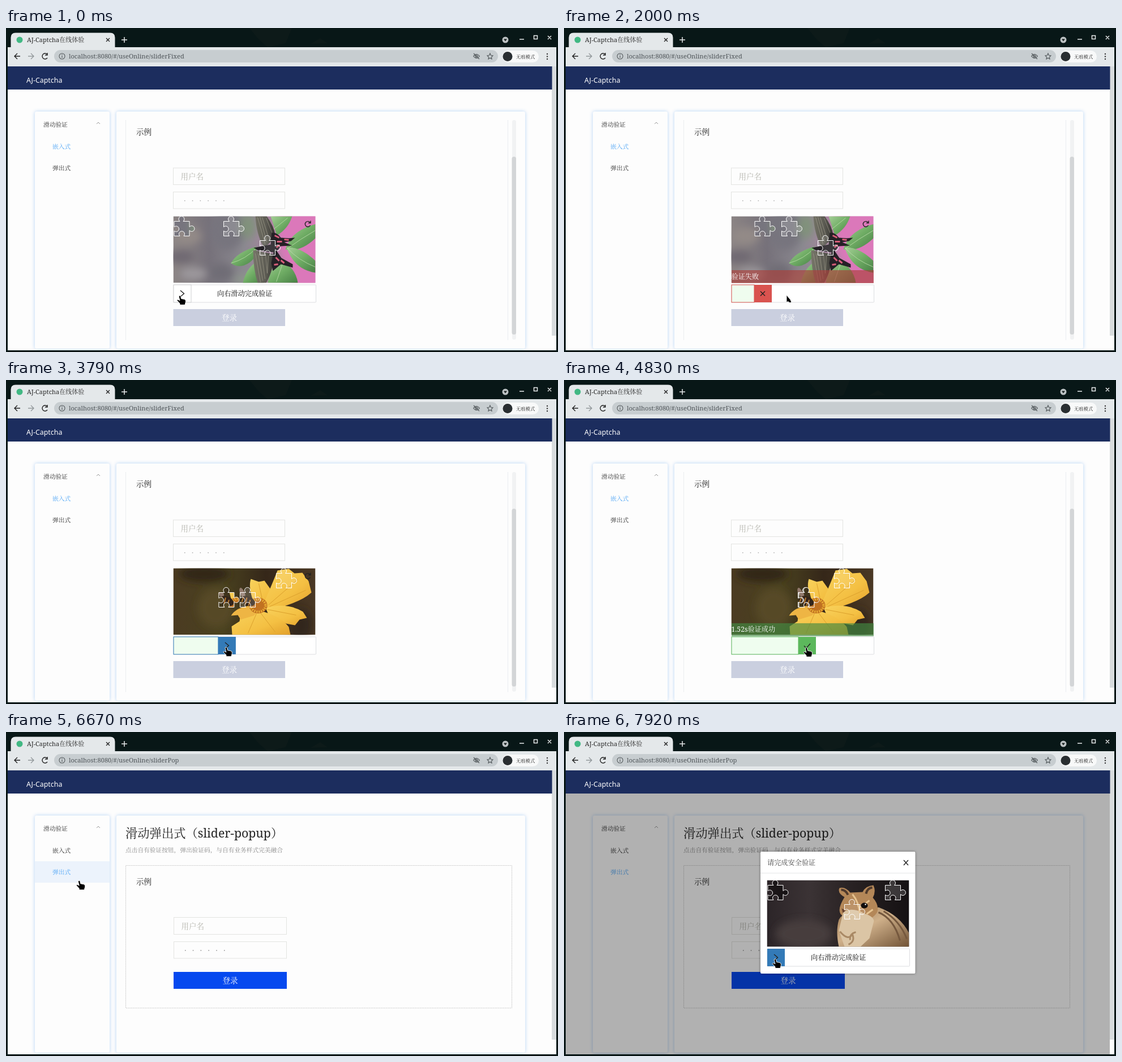
These frames come from a looping animation (975x574 px, 8 s). An HTML page:

```html
<!DOCTYPE html>
<html lang="zh">
<head>
<meta charset="utf-8">
<title>AJ-Captcha在线体验</title>
<style>
html, body { margin: 0; width: 100%; height: 100%; overflow: hidden; background: #081717; }
svg { display: block; width: 975px; height: 574px; }
text { font-family: "Noto Serif", "Noto Serif CJK SC", "Noto Sans CJK SC", "Noto Sans CJK", serif; font-size: 10.7px; fill: #2c2c2c; white-space: pre; }
.mid { font-size: 12.2px; fill: #080808; }
.big { font-size: 13.5px; fill: #1c1c1c; }
.hint { font-size: 13.5px; fill: #b3b3ab; }
.button { font-size: 13.5px; fill: #fff; text-anchor: middle; }
.line { fill: none; stroke: #222; stroke-width: 1.4; }
.field { fill: #fdfdfd; stroke: #e3e4e1; }
.card { fill: #fdfdfd; filter: drop-shadow(0 0 3px #b4d3f6); }
.outline { stroke: #fff; stroke-width: 1; }
</style>
</head>
<body>
<svg viewBox="0 0 975 574">
<defs>
  <path id="jigsaw" d="M0 9H10A5 5 0 1 1 16 9H27V19A5 5 0 1 1 27 25V35H17A5 5 0 1 0 10 35H0V26A5 5 0 1 0 0 19Z"/>
  <clipPath id="jigsawClip"><use href="#jigsaw"/></clipPath>
  <clipPath id="photoClip"><rect width="251" height="118"/></clipPath>
  <clipPath id="tipClip"><rect x="296" y="333" width="251" height="122"/></clipPath>
  <clipPath id="pageClip"><rect x="3" y="68" width="961" height="503"/></clipPath>
  <filter id="soft" x="-50%" y="-50%" width="200%" height="200%"><feGaussianBlur stdDeviation="7"/></filter>
  <filter id="fine"><feGaussianBlur stdDeviation=".7"/></filter>
  <linearGradient id="stone"><stop stop-color="#8b8484"/><stop offset=".25" stop-color="#76717a"/><stop offset=".5" stop-color="#8b8990"/><stop offset="1" stop-color="#d680b8"/></linearGradient>
  <linearGradient id="leaf" x2="1" y2="1"><stop stop-color="#a5cf97"/><stop offset=".5" stop-color="#70ad65"/><stop offset="1" stop-color="#477f45"/></linearGradient>
  <linearGradient id="wing" x2="1"><stop stop-color="#777669"/><stop offset=".6" stop-color="#5b5a52"/><stop offset="1" stop-color="#34332f"/></linearGradient>
  <linearGradient id="earth"><stop stop-color="#4b3b22"/><stop offset=".35" stop-color="#4a421f"/><stop offset=".65" stop-color="#352719"/><stop offset="1" stop-color="#4a3824"/></linearGradient>
  <linearGradient id="petal" x2="1" y2="1"><stop stop-color="#f8d25c"/><stop offset=".6" stop-color="#f4c043"/><stop offset="1" stop-color="#e2a02b"/></linearGradient>
  <linearGradient id="night"><stop stop-color="#2c2528"/><stop offset=".3" stop-color="#3b3335"/><stop offset=".55" stop-color="#2b2425"/><stop offset="1" stop-color="#151113"/></linearGradient>
  <linearGradient id="fur" x2="1" y2="1"><stop stop-color="#a17b51"/><stop offset=".45" stop-color="#cfb08a"/><stop offset="1" stop-color="#705235"/></linearGradient>

  <g id="butterfly" clip-path="url(#photoClip)">
    <rect width="251" height="118" fill="url(#stone)"/>
    <g filter="url(#soft)">
      <ellipse cx="25" cy="35" rx="25" ry="16" fill="#938a87"/><ellipse cx="12" cy="72" rx="25" ry="12" fill="#6f6972"/>
      <ellipse cx="35" cy="102" rx="24" ry="12" fill="#9b979b"/><ellipse cx="85" cy="100" rx="22" ry="16" fill="#706d76"/>
      <ellipse cx="95" cy="25" rx="30" ry="35" fill="#77757e"/><path d="M180-10H260V130H215L185 55Z" fill="#db78ba"/>
      <ellipse cx="132" cy="18" rx="14" ry="22" fill="#81927b"/><ellipse cx="125" cy="112" rx="18" ry="9" fill="#8c948b"/>
    </g>
    <g filter="url(#fine)">
      <g fill="url(#leaf)">
        <path d="M102 83Q112 64 146 54Q150 77 125 87Q112 91 102 83Z"/>
        <path d="M123 118Q128 94 145 82L160 118Z"/>
        <path d="M172 0H210Q203 22 183 34Z"/>
        <path d="M198 59Q207 26 251 14V39Q225 64 198 59Z"/>
        <path d="M200 55Q225 54 251 79V100Q213 94 200 55Z"/>
        <path d="M167 118Q170 92 190 78Q216 91 220 118Z"/>
      </g>
      <path d="M102 83Q128 76 147 56M199 59Q225 40 251 25M202 57Q221 78 251 90M182 116L193 84M176 24L202 3" fill="none" stroke="#bedfac" stroke-width=".8"/>
      <path d="M145 0H165Q178 18 180 33Q174 47 160 55Q147 34 145 0ZM141 60L177 67Q178 94 164 118H149Q141 93 141 60Z" fill="url(#wing)"/>
      <path d="M149 2L162 49M153 1L165 45M157 2L169 40M164 3L175 31M145 66L154 117M150 66L158 114M156 67L162 111M163 69L166 101M168 69L166 101" stroke="#aaa694" stroke-width=".6"/>
      <path d="M174 29Q183 28 190 38L204 39L215 38L208 44L196 46L210 52L190 53L183 62L191 74L211 85L211 91L190 85L176 97L173 83L177 64L149 60L142 56L172 50Z" fill="#252126"/>
      <path d="M179 34L187 38M183 45L192 45M182 55L188 51M181 73L187 79M178 86L185 85M190 78L196 83M196 41L204 42" stroke="#d85d79" stroke-width="3"/>
    </g>
  </g>

  <g id="flower" clip-path="url(#photoClip)">
    <rect width="251" height="118" fill="url(#earth)"/>
    <g filter="url(#soft)"><ellipse cx="75" cy="70" rx="32" ry="35" fill="#564a25"/><ellipse cx="55" cy="10" rx="45" ry="15" fill="#302719"/><ellipse cx="225" cy="100" rx="20" ry="28" fill="#30271b"/></g>
    <g filter="url(#fine)">
      <path d="M142 61Q132 33 137 19L151 24L161 22L171 36L181 42L171 71Z" fill="url(#petal)"/>
      <path d="M158 66Q176 25 184 4L204 1L214 9L228 8L239 23L244 43Q226 60 178 72Z" fill="url(#petal)"/>
      <path d="M163 70Q201 60 229 77L236 88L223 91L215 101L199 98L168 82Z" fill="url(#petal)"/>
      <path d="M151 75Q188 83 204 104L207 118H104L103 103L117 94L118 87Z" fill="url(#petal)"/>
      <path d="M102 84Q111 69 137 66L153 73L142 84L119 91L114 83Z" fill="#eeb544"/>
      <path d="M168 65L220 20M170 68L234 39M166 73L217 83M154 79L180 113M147 80L132 115M158 60L151 27" stroke="#dca12d"/>
      <ellipse cx="150" cy="66" rx="16" ry="14" fill="#c17221"/><ellipse cx="150" cy="66" rx="13" ry="11" fill="none" stroke="#edb336" stroke-width="4" stroke-dasharray="2 2"/>
      <ellipse cx="122" cy="44" rx="4" ry="10" fill="#91796c" transform="rotate(-22 122 44)"/>
      <ellipse cx="132" cy="58" rx="13" ry="8" fill="#34251b" transform="rotate(25 132 58)"/>
      <path d="M124 51L121 60M130 52L127 64M136 56L133 66" stroke="#bd7d32" stroke-width="2"/>
    </g>
  </g>

  <g id="squirrel" clip-path="url(#photoClip)">
    <rect width="251" height="118" fill="url(#night)"/>
    <ellipse cx="65" cy="95" rx="50" ry="25" fill="#463c3d" filter="url(#soft)"/>
    <g filter="url(#fine)">
      <path d="M127 118Q121 91 127 70Q132 58 150 61L197 48Q235 62 251 94V118Z" fill="url(#fur)"/>
      <path d="M137 30Q124 23 128 14Q138 11 147 22L169 21Q174 10 188 9Q193 20 187 31Q198 43 195 56Q187 71 161 75Q138 70 130 60Q124 51 137 30Z" fill="#b48758"/>
      <path d="M131 17Q139 17 143 26M175 24Q177 14 186 13" fill="none" stroke="#503a2c" stroke-width="4"/>
      <path d="M135 55Q154 48 171 59Q187 63 189 72L181 103L165 118H137L127 89Z" fill="#dbc5a5"/>
      <path d="M151 25Q162 38 164 59M181 36L165 48M187 52L176 60" fill="none" stroke="#e6c390" stroke-width="3"/>
      <path d="M197 57Q224 68 235 107M206 55Q235 72 247 104" fill="none" stroke="#75583e" stroke-width="3"/>
      <ellipse cx="172" cy="45" rx="6" ry="5" fill="#100d0d"/><circle cx="174" cy="43" r="1.2" fill="#fff"/>
      <path d="M132 50L139 54L134 58Z" fill="#65402e"/>
      <path d="M129 91Q143 108 151 96Q156 109 144 114M157 92Q145 95 147 106" fill="none" stroke="#a98965" stroke-width="3"/>
    </g>
  </g>
</defs>

<!-- Browser window -->
<rect width="975" height="574" fill="#081717"/>
<path d="M430 0H505L494 27L462 34L446 20ZM538 28L555 18L568 27Z" fill="#0d1a19"/>
<path d="M3 34H8.5V17Q8.5 8.5 17 8.5H184Q192.5 8.5 192.5 17V34H972V68H3Z" fill="#e4e8ea"/>
<circle cx="24" cy="21" r="5.5" fill="#41b883"/>
<text x="37" y="25" style="font-size:11px">AJ-Captcha在线体验</text>
<path class="line" d="M177 18L183 24M183 18L177 24"/>
<path d="M204 21H214M209 16V26M907 20H915M932.5 13.5H938.5V19.5H932.5ZM957 14L963 20M963 14L957 20" fill="none" stroke="#e7eaeb" stroke-width="1.5"/>
<circle cx="882" cy="21" r="5.5" fill="#bdc2c4"/><path d="M879 19.5H885L882 23.5Z" fill="#17201f"/>
<rect x="85" y="39" width="784" height="22" rx="11" fill="#c7cdd0"/>
<rect x="877" y="40" width="64" height="21" rx="10.5" fill="#f8f9f9"/>
<circle cx="886" cy="50.5" r="8.5" fill="#292e31"/>
<text x="901" y="54" style="font-size:8.3px">无痕模式</text>
<path class="line" d="M25 50H15M20 45L15 50L20 55M73 47A5 5 0 1 0 73 53M73 44V48H69"/>
<path class="line" style="stroke:#93999c" d="M39 50H49M44 45L49 50L44 55"/>
<g fill="none" stroke="#52585b" stroke-width="1.1">
  <circle cx="99" cy="50" r="5"/><path d="M99 49V53M99 46.5V48M825.5 50Q831 43 836.5 50Q831 57 825.5 50M826 45L836 55"/><circle cx="831" cy="50" r="2"/>
  <path d="M855 45L856.5 48.5L860 49L857.5 51.5L858 55L855 53L852 55L852.5 51.5L850 49L853.5 48.5Z"/>
</g>
<g fill="#333"><circle cx="956" cy="46" r="1.2"/><circle cx="956" cy="50.5" r="1.2"/><circle cx="956" cy="55" r="1.2"/></g>
<text id="url" x="111" y="54" style="font-size:11.1px;fill:#50565a"></text>

<!-- Page -->
<rect x="3" y="68" width="969" height="503" fill="#fdfdfd"/>
<rect x="964" y="68" width="8" height="477" fill="#d8dcde"/>
<rect x="3" y="68" width="961.5" height="41" fill="#1c2d5e"/>
<text x="36" y="97" style="font:500 12.4px 'Noto Sans',sans-serif;fill:#fff">AJ-Captcha</text>
<g clip-path="url(#pageClip)">
  <rect class="card" x="51" y="148" width="132" height="420" rx="3"/>
  <rect class="card" x="195" y="148" width="722" height="420" rx="3"/>
  <rect id="menuRow" x="51" y="229" width="132" height="38"/>
  <text x="66" y="175">滑动验证</text>
  <path d="M160 170L163 167L166 170" fill="none" stroke="#999"/>
  <text id="menuFixed" x="82" y="214">嵌入式</text>
  <text id="menuPop" x="82" y="252">弹出式</text>
  <g id="fixedPage">
    <path d="M211.5 163V553M886.5 163V553" stroke="#ebedf0"/>
    <rect x="894" y="163" width="7" height="389" rx="3.5" fill="#f1f2f3"/><rect x="893.5" y="228" width="7.5" height="315" rx="3.5" fill="#d3d5d7"/>
    <text class="big" x="230" y="189">示例</text>
    <rect class="field" x="295.5" y="248" width="197" height="29.5"/><rect class="field" x="295.5" y="290.5" width="197" height="29.5"/>
    <text class="hint" x="308.5" y="268">用户名</text>
    <path d="M315 306H386" stroke="#aaa" stroke-width="1.5" stroke-dasharray="1.5 12.3"/>
    <rect x="295.5" y="498" width="197.5" height="30" fill="#cacfdf"/>
    <text class="button" x="394.5" y="518">登录</text>
  </g>
  <g id="popPage">
    <text x="211" y="187" style="font-size:21.3px;fill:#222">滑动弹出式（slider-popup）</text>
    <text x="211" y="213" style="fill:#858585">点击自有验证按钮，弹出验证码，与自有业务样式完美融合</text>
    <rect x="211.5" y="236.5" width="682" height="252.5" fill="none" stroke="#ccc" stroke-dasharray="2 1"/>
    <text class="big" x="230" y="270">示例</text>
    <rect class="field" x="296.5" y="328.5" width="199" height="30"/><rect class="field" x="296.5" y="371.5" width="199" height="29.5"/>
    <text class="hint" x="309.5" y="349">用户名</text>
    <path d="M316 387H387" stroke="#888" stroke-width="1.5" stroke-dasharray="1.5 12.3"/>
    <rect x="296" y="425" width="200" height="30" fill="#0649ef"/>
    <text class="button" x="396" y="445">登录</text>
  </g>
</g>
<g id="dialog">
  <rect x="3" y="109" width="961" height="462" fill="#000" opacity=".3"/>
  <rect x="347" y="212" width="273.5" height="216" rx="2" fill="#fff" style="filter:drop-shadow(0 0 2px #0006)"/>
  <path d="M347 250H620" stroke="#e4e5e6"/>
  <text class="mid" x="359" y="236" style="fill:#444">请完成安全验证</text>
  <path class="line" d="M600 227L608 236M608 227L600 236"/>
</g>

<g id="captcha">
  <g transform="translate(295.5 333.5)">
    <use id="photo"/>
    <use id="hole" class="outline" href="#jigsaw" fill="#fff" fill-opacity=".15"/>
    <use id="decoy" class="outline" href="#jigsaw" fill="#fff" fill-opacity=".1"/>
    <g id="piece"><g clip-path="url(#jigsawClip)"><use id="cutout"/></g><use class="outline" href="#jigsaw" fill="none"/></g>
    <path id="reload" class="line" d="M241.5 11A4.8 4.8 0 1 0 242 16M242.5 8V12H238.5"/>
  </g>
  <g clip-path="url(#tipClip)"><g id="tip">
    <rect id="tipBack" x="295.5" y="429" width="252" height="23" fill-opacity=".65"/>
    <text id="tipText" class="mid" x="295.5" y="444.5" style="fill:#fff"></text>
  </g></g>
  <rect x="296" y="455" width="251.5" height="31" rx="1" fill="#fff" stroke="#dcdde0"/>
  <text id="prompt" class="mid" x="373" y="475">向右滑动完成验证</text>
  <rect id="trail" x="296" y="455" height="31" fill="#effdef"/>
  <g id="handle">
    <rect id="block" x="296" y="455" width="31" height="31"/>
    <path id="icon" class="line"/>
  </g>
</g>
<path id="cursor" fill="#000" stroke="#fff" stroke-width=".9"/>
</svg>
<script>
const LOOP = 8000, MENU_CLICK = 6450, DIALOG_OPEN = 7580, RESET = 300;
const URL_BASE = 'localhost:8080/#/useOnline/';
const HAND = 'M-1-1Q-3-1-2.7 1L-1 8Q-5 5-6 7.5L-1 13V15.5H8L9.5 10Q10 6 7 5.5L1.5 4.5.7.5Q.4-1-1-1Z';
const ARROW = 'M0 0V13L3 11.5L5 13.5H9L7 8.5Z';
const ICONS = {
  right: 'M308 465L314.5 470.5L308 476',
  cross: 'M307 466.5L315 474.5M315 466.5L307 474.5',
  check: 'M306 471L310 475L317 467'
};

const path = [
  [0, 308, 475], [300, 308, 475], [1250, 348, 475], [1450, 348, 475], [1900, 393, 473],
  [2100, 393, 473], [2500, 311, 473], [2980, 311, 473], [4300, 429, 475], [5000, 429, 475],
  [5950, 113, 251], [6550, 113, 251], [7300, 360, 440], [7540, 360, 440], [7880, 374, 403], [LOOP, 374, 403]
];
const drags = [
  { start: 300, end: 1350, reset: 2350, fromX: 308, color: '#d9534f', tip: '#ac3f3b', icon: 'cross', words: '验证失败' },
  { start: 2980, end: 4500, reset: 5500, fromX: 311, color: '#5cb85c', tip: '#428b42', icon: 'check', words: '1.52s验证成功' }
];
const puzzles = [
  { from: 0, photo: 'butterfly', hole: [89, 0], decoy: [153, 34] },
  { from: 2460, photo: 'flower', hole: [118, 34], decoy: [182, 0] },
  { from: 5620, photo: 'flower', hole: [83, 34], decoy: [186, 0] },
  { from: DIALOG_OPEN, photo: 'squirrel', hole: [209, 0], decoy: [137, 34] }
];

const el = Object.fromEntries([...document.querySelectorAll('[id]')].map(node => [node.id, node]));
const set = (name, attrs) => { for (const key in attrs) el[name].setAttribute(key, attrs[key]); };
const show = (name, visible) => set(name, { visibility: visible ? 'visible' : 'hidden' });
const move = (name, x, y = 0) => set(name, { transform: `translate(${x} ${y})` });
const clamp = v => Math.min(1, Math.max(0, v));
const ease = v => 1 - (1 - clamp(v)) ** 2.3;

function pointerAt(t) {
  const i = path.findIndex(p => p[0] > t);
  const [t0, x0, y0] = path[i - 1], [t1, x1, y1] = path[i];
  const p = (t - t0) / (t1 - t0), s = p * p * (3 - 2 * p);
  return [x0 + (x1 - x0) * s, y0 + (y1 - y0) * s];
}

function sliderAt(t) {
  const drag = drags.find(d => t >= d.start && t < d.reset + RESET);
  if (!drag) return { left: 0, color: '#fff', icon: 'right', idle: true };
  const left = pointerAt(Math.min(t, drag.end))[0] - drag.fromX;
  if (t < drag.end) return { left, color: '#337ab7', icon: 'right' };
  if (t < drag.reset) return { left, color: drag.color, icon: drag.icon };
  return { left: left * (1 - ease((t - drag.reset) / RESET)), color: '#fff', icon: 'right' };
}

function drawTip(t) {
  const drag = drags.find(d => t >= d.end && t < d.reset + 500);
  show('tip', drag);
  if (!drag) return;
  const rise = t < drag.reset ? ease((t - drag.end) / 500) : 1 - ease((t - drag.reset) / 500);
  move('tip', 0, 23 * (1 - rise));
  set('tipBack', { fill: drag.tip });
  el.tipText.textContent = drag.words;
}

function drawCaptcha(t, slider, hovered) {
  const { photo, hole, decoy } = puzzles.findLast(p => t >= p.from);
  const dialog = t >= DIALOG_OPEN;
  set('captcha', { display: dialog || t < MENU_CLICK ? 'inline' : 'none' });
  move('captcha', dialog ? 63 : 0, dialog ? -71 : 0);
  set('photo', { href: '#' + photo });
  set('cutout', { href: '#' + photo });
  move('hole', ...hole);
  move('decoy', ...decoy);
  move('cutout', -hole[0], -hole[1]);
  move('piece', 1.5 + slider.left, hole[1]);
  set('reload', { display: dialog || slider.icon === 'check' ? 'none' : 'inline' });

  const color = dialog && hovered ? '#337ab7' : slider.color;
  const white = color === '#fff';
  set('prompt', { display: slider.idle ? 'inline' : 'none' });
  set('trail', { width: slider.left, stroke: slider.left > 0 ? (white ? '#ddd' : color) : 'none' });
  move('handle', slider.left);
  set('block', { fill: color, stroke: white ? '#cfd0d2' : 'none' });
  set('icon', { d: ICONS[slider.icon] });
  drawTip(t);
}

function draw(t) {
  const pop = t >= MENU_CLICK, dialog = t >= DIALOG_OPEN;
  const [x, y] = pointerAt(t), slider = sliderAt(t);
  const inside = (x0, y0, w, h) => x >= x0 && x < x0 + w && y >= y0 && y < y0 + h;
  const onHandle = dialog ? inside(359, 384, 32, 32) : !pop && inside(295 + slider.left, 455, 33, 32);
  const onMenu = inside(51, 229, 132, 38);
  const onButton = pop && !dialog && inside(296, 425, 200, 30);
  const onLink = onMenu || inside(51, 191, 132, 38);

  el.url.textContent = URL_BASE + (pop ? 'sliderPop' : 'sliderFixed');
  show('fixedPage', !pop);
  show('popPage', pop);
  show('dialog', dialog);
  show('menuRow', !dialog && (pop || onMenu));
  set('menuRow', { fill: pop ? '#ecf3fc' : '#f4fafd' });
  el.menuFixed.style.fill = pop ? '#2c2c2c' : '#4ba3f5';
  el.menuPop.style.fill = pop ? '#4ba3f5' : '#2c2c2c';
  drawCaptcha(t, slider, onHandle);

  set('cursor', { d: onHandle || onLink || onButton ? HAND : ARROW });
  move('cursor', x, y);
}

const begin = performance.now();
function tick() {
  draw((performance.now() - begin) % LOOP);
  requestAnimationFrame(tick);
}
tick();
</script>
</body>
</html>
```
